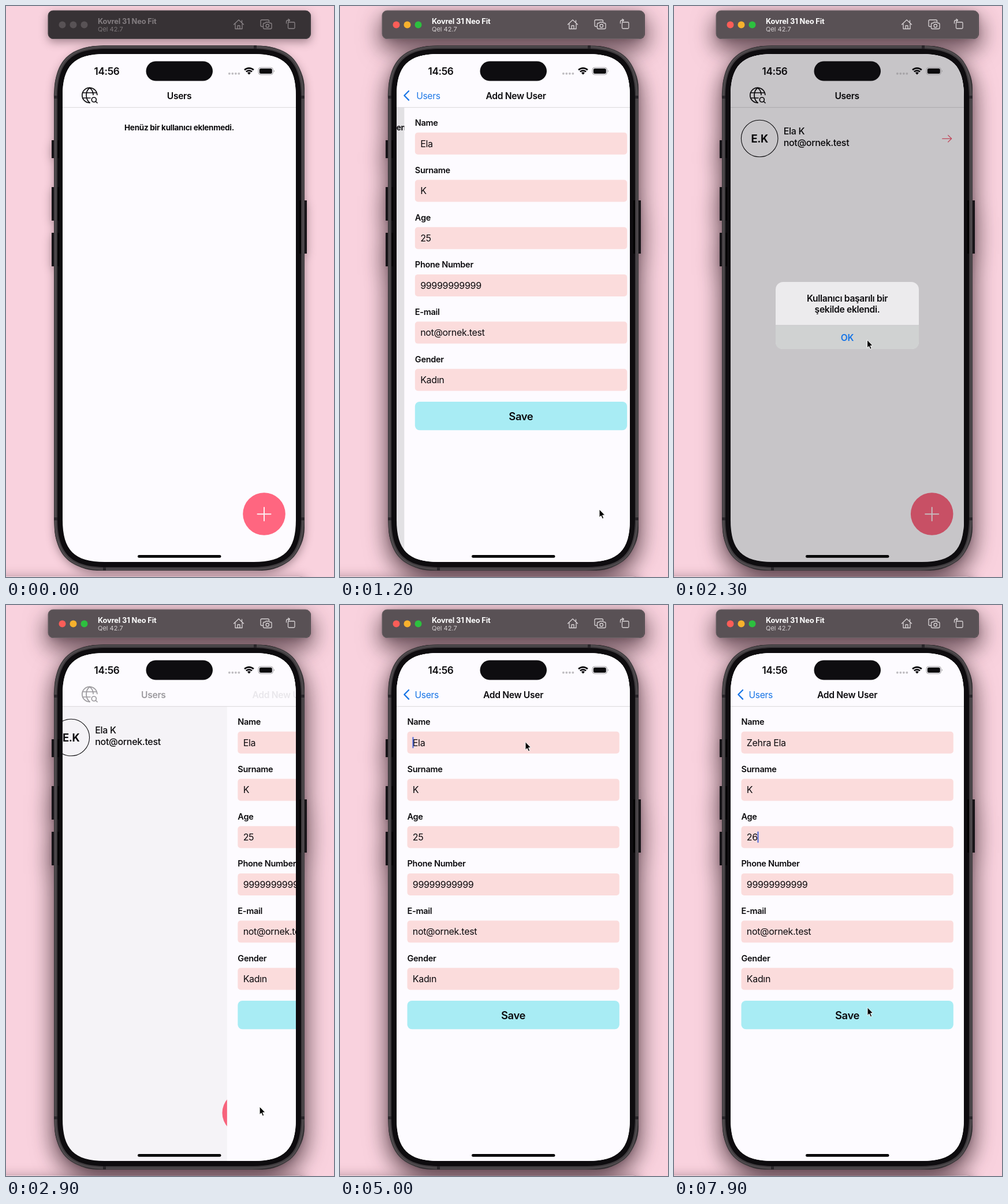
Recreate the animation shown at these times as an HTML page. Size 568x987 px, loop 8000 ms.

```html
<!DOCTYPE html>
<html lang="tr">
<head>
<meta charset="utf-8">
<title>Users</title>
<style>
html, body { margin: 0; width: 100%; height: 100%; overflow: hidden; background: #f9d2de; }
#stage { position: relative; width: 568px; height: 987px; overflow: hidden; background: #f9d2de; }
#stage > *, .cast > * { position: absolute; }
.cast { inset: 0; filter: drop-shadow(0 5px 8px rgba(30, 10, 18, .4)); }
.active .cast { filter: drop-shadow(0 15px 20px rgba(30, 10, 18, .68)) drop-shadow(0 2px 4px rgba(30, 10, 18, .2)); }
.cast > * { background: #2c292c; }
#barCast { left: 72.5px; top: 7.5px; width: 455px; height: 49.5px; border-radius: 9px; }
#bodyCast { left: 83.5px; top: 68.5px; width: 433px; height: 907px; border-radius: 74px; }
.leftKey { left: 79px; width: 14px; border-radius: 2px; }
.rightKey { left: 507px; width: 14px; border-radius: 2px; }
#sheet { left: -20px; top: 984.5px; width: 543px; height: 20px; border-radius: 0 18px 0 0;
  background: #f6d9e1; border-top: 1px solid #d3aebb; box-shadow: 0 0 18px rgba(80, 45, 58, .34); }
svg { left: 0; top: 0; }
text { font-family: Inter, "Liberation Sans", sans-serif; letter-spacing: -.02em; fill: #0b0a0d; white-space: pre; }
.mid { text-anchor: middle; }
.semi { font-weight: 600; }
.t13 { font-size: 13.5px; font-weight: 700; }
.t15 { font-size: 14.5px; }
.t16 { font-size: 15.6px; }
.field { font-size: 16px; }
.link { fill: #1674e6; }
.line { fill: none; stroke: #0b0a0d; stroke-linecap: round; stroke-linejoin: round; }
#bar { fill: #373235; stroke: #4a4548; }
.active #bar { fill: #595155; stroke: #6c6468; }
#bar + text { font-size: 12.8px; font-weight: 700; letter-spacing: -.01em; fill: #837d80; }
.active #bar + text { fill: #fff; }
#os { font-size: 11px; letter-spacing: 0; fill: #7d777a; }
.active #os { fill: #d5d0d2; }
.light { fill: #585255; }
.active .light { fill: var(--on); }
#tools { stroke: #8a8487; stroke-width: 1.3; }
.active #tools { stroke: #d8d3d5; }
</style>
</head>
<body>
<div id="stage">
  <div id="sheet"></div>
  <div class="cast">
    <div id="bodyCast"></div>
    <div class="leftKey" style="top:232px;height:31px"></div>
    <div class="leftKey" style="top:313px;height:58px"></div>
    <div class="leftKey" style="top:392px;height:58px"></div>
    <div class="rightKey" style="top:336px;height:92px"></div>
  </div>
  <div class="cast"><div id="barCast"></div></div>
  <svg width="568" height="987" viewBox="0 0 568 987">
    <defs>
      <clipPath id="screen"><path data-box="98 83 404 878 57"/></clipPath>
    </defs>

    <rect id="bar" x="73" y="8" width="454" height="48.5" rx="8.5"/>
    <text x="159" y="30.5">Kovrel 31 Neo Fit</text>
    <text id="os" x="159" y="44">Qel 42.7</text>
    <circle class="light" style="--on:#fb5d58" cx="97.5" cy="32.5" r="6"/>
    <circle class="light" style="--on:#f7b12d" cx="116.5" cy="32.5" r="6"/>
    <circle class="light" style="--on:#2dc03f" cx="135.5" cy="32.5" r="6"/>
    <g id="tools" class="line">
      <path d="M394.5 32 L403 24 L411.5 32 M397 30.5 V39.5 H409 V30.5 M401 39.5 V34 H405 V39.5 M408.5 28 V25"/>
      <path d="M444.5 35.5 H443 Q441 35.5 441 33.5 V26 Q441 24 443 24 H453.5 Q455.5 24 455.5 26 V27"/>
      <path d="M447.5 29.5 H449 L450 28 H455.5 L456.5 29.5 H458 Q460 29.5 460 31.5 V37.5 Q460 39.5 458 39.5 H447.5 Q445.5 39.5 445.5 37.5 V31.5 Q445.5 29.5 447.5 29.5 Z"/>
      <circle cx="452.8" cy="34.2" r="2.7"/>
      <rect x="488.5" y="28" width="11.5" height="11" rx="1.5"/>
      <path d="M485.5 30 V27.5 Q485.5 24.5 488.5 24.5 H491 M489 22.5 L491.5 24.5 L489 26.7"/>
    </g>

    <path data-box="83 68 434 908 72" fill="#3f3b3e"/>
    <path data-box="85.5 70.5 429 903 69.5" fill="none" stroke="#524d50" stroke-width="2"/>
    <path d="M83 155h6v5h-6zM511 155h6v5h-6zM83 884h6v5h-6zM511 884h6v5h-6zM429 68h5v6h-5zM168 970h5v6h-5z" fill="#29262a"/>
    <path data-box="89 74 422 896 66" fill="#0e0c0f"/>
    <path d="M79 232h4v31h-4zM79 313h4v58h-4zM79 392h4v58h-4zM517 336h4v92h-4z" fill="#171418"/>
    <path d="M89 232h3v31h-3zM89 313h3v58h-3zM89 392h3v58h-3zM508 336h3v92h-3z" fill="#020102"/>

    <g clip-path="url(#screen)">
      <rect x="98" y="83" width="404" height="878" fill="#fdfbff"/>
      <g id="home">
        <text id="empty" class="t13 mid" x="300" y="215">Henüz bir kullanıcı eklenmedi.</text>
        <g id="list">
          <circle class="line" cx="148.5" cy="229" r="31.8" stroke-width="1.1"/>
          <text class="mid" x="148.5" y="236" font-size="18.4" font-weight="700">E.K</text>
          <text class="field" x="190" y="222" font-weight="500">Ela K</text>
          <text class="field" x="190" y="242" font-weight="500">not@ornek.test</text>
          <path class="line" d="M465 229.3 H481 M475 223.5 L481 229.3 L475 235" style="stroke:#f45a73" stroke-width="1.2"/>
        </g>
        <circle cx="447" cy="878" r="36.8" fill="#ff6680"/>
        <path class="line" d="M435.5 878.3 H458.5 M447 866.8 V889.8" style="stroke:#fdeef2" stroke-width="2"/>
      </g>
      <rect id="shade" x="98" y="83" width="404" height="878"/>
      <g id="form"><rect x="98" y="83" width="404" height="878" fill="#fdfbff"/></g>

      <rect x="98" y="83" width="404" height="92" fill="#fdfbff"/>
      <rect x="98" y="174.8" width="404" height="1" fill="#d9d7da"/>
      <g id="globe" class="line" stroke-width="1.7">
        <path d="M157.8 153.5 A13 13 0 1 0 145 167.3 M133 150 H157 M133 159 H146"/>
        <path d="M145 141.5 C137 147 137 161 145 167.3 M145 141.5 C149 144.5 151 149 151 153.5"/>
        <circle cx="152.3" cy="162" r="4"/>
        <path d="M155.3 165 L158 167.5"/>
      </g>
      <text id="usersTitle" class="t16 semi mid" x="300" y="160.5">Users</text>
      <path id="chevron" class="line" d="M119 147 L111.3 154.8 L119 162.6" style="stroke:#1674e6" stroke-width="2.3"/>
      <text id="backText" class="t16 link" x="129.5" y="160.5">Users</text>
      <text id="formTitle" class="t16 semi mid" x="300" y="160.5">Add New User</text>

      <rect id="dim" x="98" y="83" width="404" height="878" opacity="0"/>
      <text class="semi" x="152.5" y="118.8" font-size="17.2">14:56</text>
      <rect x="242.5" y="95.5" width="115.5" height="34" rx="17" fill="#0e0d10"/>
      <g fill="#8b898c" opacity=".55">
        <circle cx="386.8" cy="116.8" r="1.9"/><circle cx="392.3" cy="116.8" r="1.9"/>
        <circle cx="397.8" cy="116.8" r="1.9"/><circle cx="403.3" cy="116.8" r="1.9"/>
      </g>
      <path class="line" style="stroke-linecap:butt" stroke-width="2.6"
        d="M413 110.5 A11.5 11.5 0 0 1 428.8 110.5 M415.8 113.7 A7.2 7.2 0 0 1 426 113.7"/>
      <path d="M417.9 115.6 A4.5 4.5 0 0 1 423.9 115.6 L420.9 118.7 Z" fill="#0b0a0d"/>
      <rect x="437" y="106.3" width="25.5" height="12.4" rx="4" fill="none" stroke="#99979a"/>
      <rect x="438.8" y="108" width="22" height="9" rx="2.5" fill="#0b0a0d"/>
      <path d="M464 110.5 Q466 112.5 464 114.5 Z" fill="#99979a"/>
      <g id="alert">
        <rect x="176" y="477" width="248" height="116" rx="13" fill="#ecebed"/>
        <path id="okPress" d="M176 552 H424 V580 Q424 593 411 593 H189 Q176 593 176 580 Z" fill="#d0d2d2"/>
        <rect x="176" y="551.5" width="248" height=".8" fill="#c3c1c4"/>
        <text class="semi mid" x="300" y="510.5" font-size="15.65">Kullanıcı başarılı bir</text>
        <text class="semi mid" x="300" y="530" font-size="15.65">şekilde eklendi.</text>
        <text class="t16 semi mid link" x="300" y="578.8">OK</text>
      </g>
      <rect x="228" y="949" width="144.5" height="4.8" rx="2.4" fill="#020203"/>
    </g>
    <path id="cursor" d="M0 0 V14 L3.1 11.2 L5.3 16.3 L7.7 15.3 L5.5 10.3 L9.7 10 Z" fill="#050505" stroke="#fff" stroke-linejoin="round"/>
  </svg>
</div>
<script>
const LOOP = 8000, STEP = 100, WIDTH = 404;
const $ = id => document.getElementById(id);
const clamp = v => Math.min(1, Math.max(0, v));
const ramp = (t, from, to) => clamp((t - from) / (to - from));
const ease = v => v * v * (3 - 2 * v);
const fade = (id, v) => $(id).setAttribute('opacity', v);
const shift = (id, x, y = 0) => $(id).setAttribute('transform', `translate(${x} ${y})`);

// Rounded box with continuous-curvature corners
function squircle(x, y, w, h, r) {
  const a = 1.28 * r, c = .354 * r, d = a - c;
  return `M${x + a} ${y} h${w - 2 * a} c${d} 0 ${a} ${c} ${a} ${a} v${h - 2 * a} c0 ${d} ${-c} ${a} ${-a} ${a}` +
    `h${2 * a - w} c${-d} 0 ${-a} ${-c} ${-a} ${-a} v${2 * a - h} c0 ${-d} ${c} ${-a} ${a} ${-a} Z`;
}
for (const el of document.querySelectorAll('[data-box]')) {
  el.setAttribute('d', squircle(...el.dataset.box.split(' ').map(Number)));
}

function add(parent, tag, attrs, content = '') {
  const el = document.createElementNS('http://www.w3.org/2000/svg', tag);
  for (const key in attrs) el.setAttribute(key, attrs[key]);
  el.textContent = content;
  parent.append(el);
  return el;
}

const fields = [['Name', 'Ela'], ['Surname', 'K'], ['Age', '25'],
  ['Phone Number', '99999999999'], ['E-mail', 'not@ornek.test'], ['Gender', 'Kadın']];
const inputs = fields.map(([label, value], i) => {
  const y = 81.7 * i;
  add($('form'), 'text', { class: 't15 semi', x: 116.5, y: y + 207.3 }, label);
  add($('form'), 'rect', { x: 116.5, y: y + 218.8, width: 367.3, height: 38, rx: 5, fill: '#fbdcdc' });
  return add($('form'), 'text', { class: 'field', x: 125.8, y: y + 243.5 }, value);
});
add($('form'), 'rect', { x: 116.5, y: 684, width: 367.3, height: 49.3, rx: 8, fill: '#a8ecf4' });
add($('form'), 'text', { class: 'semi mid', x: 300, y: 715.5, 'font-size': 18.4 }, 'Save');
const caret = add($('form'), 'rect', { width: 1.9, height: 19.5, rx: .9, fill: '#4563d8' });

// Pointer stops: time, x, y
const stops = [[100, 449, 870], [1250, 449, 870], [1550, 335, 705], [2000, 335, 705],
  [2200, 334.5, 577], [2350, 334.5, 577], [2500, 440, 869], [2850, 440, 869], [3300, 414, 811.5],
  [4200, 321, 236.5], [5950, 321, 236.5], [6500, 221, 429.5], [6800, 165, 404], [7450, 165, 404],
  [7900, 335, 695.5]];

function pointer(t) {
  const i = stops.findIndex(s => s[0] > t);
  if (i < 0) return stops[stops.length - 1].slice(1);
  if (i === 0) return stops[0].slice(1);
  const [a, b] = [stops[i - 1], stops[i]];
  const k = ease(ramp(t, a[0], b[0]));
  return [a[1] + (b[1] - a[1]) * k, a[2] + (b[2] - a[2]) * k];
}

// Remaining part of a critically damped slide
function spring(t, start) {
  const u = Math.max(0, t - start) * .0126;
  const rest = (1 + u) * Math.exp(-u);
  return rest < .002 ? 0 : rest;
}

function drawPages(t) {
  let rest = 1;
  if (t < 1650) rest = spring(t, 784);
  else if (t < 2800) rest = 1 - spring(t, 1650);
  else rest = spring(t, 2814);
  const nav = clamp((rest - .0155) / .9845);
  shift('form', WIDTH * rest);
  shift('home', -.3 * WIDTH * (1 - rest));
  fade('shade', .11 * (1 - rest));
  shift('formTitle', 255 * nav);
  fade('formTitle', clamp(1.2 - 1.6 * nav));
  shift('usersTitle', -149 * (1 - nav));
  fade('usersTitle', clamp(2 * nav - 1));
  shift('backText', 149 * nav);
  fade('backText', clamp(1 - 2 * nav));
  fade('chevron', clamp(1 - 1.5 * nav));
  fade('globe', clamp(2 * nav - 1));
  const saved = t >= 1650;
  fade('empty', saved ? 0 : 1);
  fade('list', saved ? 1 : 0);
}

function drawAlert(t) {
  const shown = ease(ramp(t, 1800, 2150));
  const left = ease(ramp(t, 2330, 2500));
  const zoom = 1 + .15 * (1 - shown);
  fade('dim', .215 * shown * (1 - left));
  fade('alert', shown * (1 - left));
  fade('okPress', t >= 2250 ? 1 : 0);
  $('alert').setAttribute('transform', `translate(300 535) scale(${zoom}) translate(-300 -535)`);
}

function drawTyping(t) {
  const prefix = 'Zehra ';
  const typed = t < 5200 ? 0 : Math.min(prefix.length, 1 + Math.floor((t - 5200) / 130));
  inputs[0].textContent = prefix.slice(0, typed) + 'Ela';
  inputs[2].textContent = t < 7150 ? '25' : t < 7450 ? '2' : '26';

  const onAge = t >= 6900;
  const row = onAge ? 2 : 0;
  const input = inputs[row];
  const count = onAge ? input.textContent.length : typed;
  const x = 125.8 + (count ? input.getSubStringLength(0, count) : 0);
  let since = t - 4550;
  if (typed) since = t - (5200 + 130 * (typed - 1));
  if (onAge) since = t - (t < 7150 ? 6900 : t < 7450 ? 7150 : 7450);
  const phase = since % 1000;
  const glow = phase < 500 ? 1 : phase < 900 ? 1 - ramp(phase, 500, 700) : ramp(phase, 900, 1000);
  caret.setAttribute('x', x - .3);
  caret.setAttribute('y', 228 + 81.7 * row);
  caret.setAttribute('opacity', t < 4550 ? 0 : glow);
}

function draw(now) {
  const t = Math.floor(now % LOOP / STEP) * STEP;
  $('stage').classList.toggle('active', t >= 400);
  drawPages(t);
  drawAlert(t);
  drawTyping(t);
  shift('cursor', ...pointer(t));
  fade('cursor', t >= 100 ? 1 : 0);
}

const start = performance.now();
function tick() {
  draw(performance.now() - start);
  requestAnimationFrame(tick);
}
tick();
</script>
</body>
</html>
```
